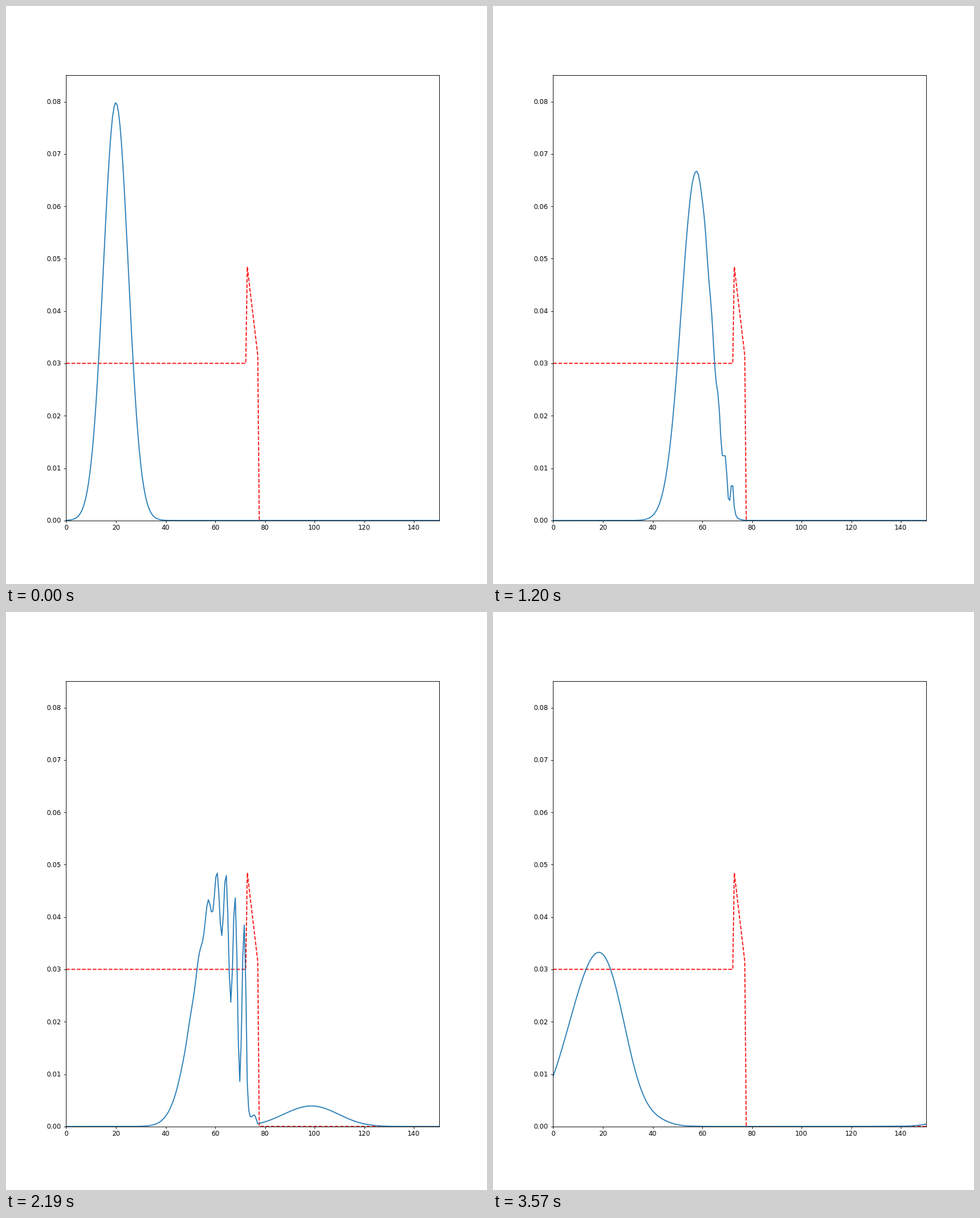
A matplotlib script for the animation above (3600 ms loop, 683 by 820 pixels).

```python
import numpy as np
import matplotlib.pyplot as plt
from matplotlib.animation import FuncAnimation

FRAMES, INTERVAL = 120, 30
DPI = 68.3

# Visible box, and a wider grid so that packets leave it without reflections
LENGTH, POINTS = 150, 250
PAD_LEFT, PAD_RIGHT = 150, 300
dx = LENGTH / (POINTS - 1)
grid = np.arange(-PAD_LEFT, POINTS + PAD_RIGHT) * dx
view = slice(PAD_LEFT, PAD_LEFT + POINTS)

# Tilted barrier between a raised left side and a grounded right side
START, END = 72.5, 77.5
V_LEFT, V_TOP = 1.5, 2.5
V_SCALE = 0.02
ramp = V_TOP + (V_LEFT - V_TOP) * (grid - START) / (END - START)
potential = np.where(grid < START, V_LEFT, np.where(grid < END, ramp, 0.0))

# Gaussian wave packet
X0, SIGMA, K0 = 20, 5, 1
packet = np.exp(-((grid - X0) / (2 * SIGMA)) ** 2 + 1j * K0 * grid)
packet /= np.sqrt(np.sum(np.abs(packet) ** 2) * dx)

# Hamiltonian with the three-point Laplacian, hbar = m = 1
hop = np.full(grid.size - 1, -0.5 / dx**2)
hamiltonian = np.diag(1 / dx**2 + potential) + np.diag(hop, 1) + np.diag(hop, -1)
energy, modes = np.linalg.eigh(hamiltonian)
weights = modes.T @ packet
visible_modes = modes[view]


def density(t):
    phased = weights * np.exp(-1j * energy * t)
    return np.abs(visible_modes @ phased) ** 2


fig, ax = plt.subplots(figsize=(10.0001, 12.006), dpi=DPI)
ax.set_xlim(0, LENGTH)
ax.set_ylim(0, 0.085)
x = grid[view]
ax.plot(x, potential[view] * V_SCALE, "r--")
wave, = ax.plot(x, density(0), color="C0")


def draw(i):
    wave.set_ydata(density(i))
    return wave,


anim = FuncAnimation(fig, draw, frames=FRAMES, interval=INTERVAL,
                     repeat=True, repeat_delay=0)
plt.show()
```
